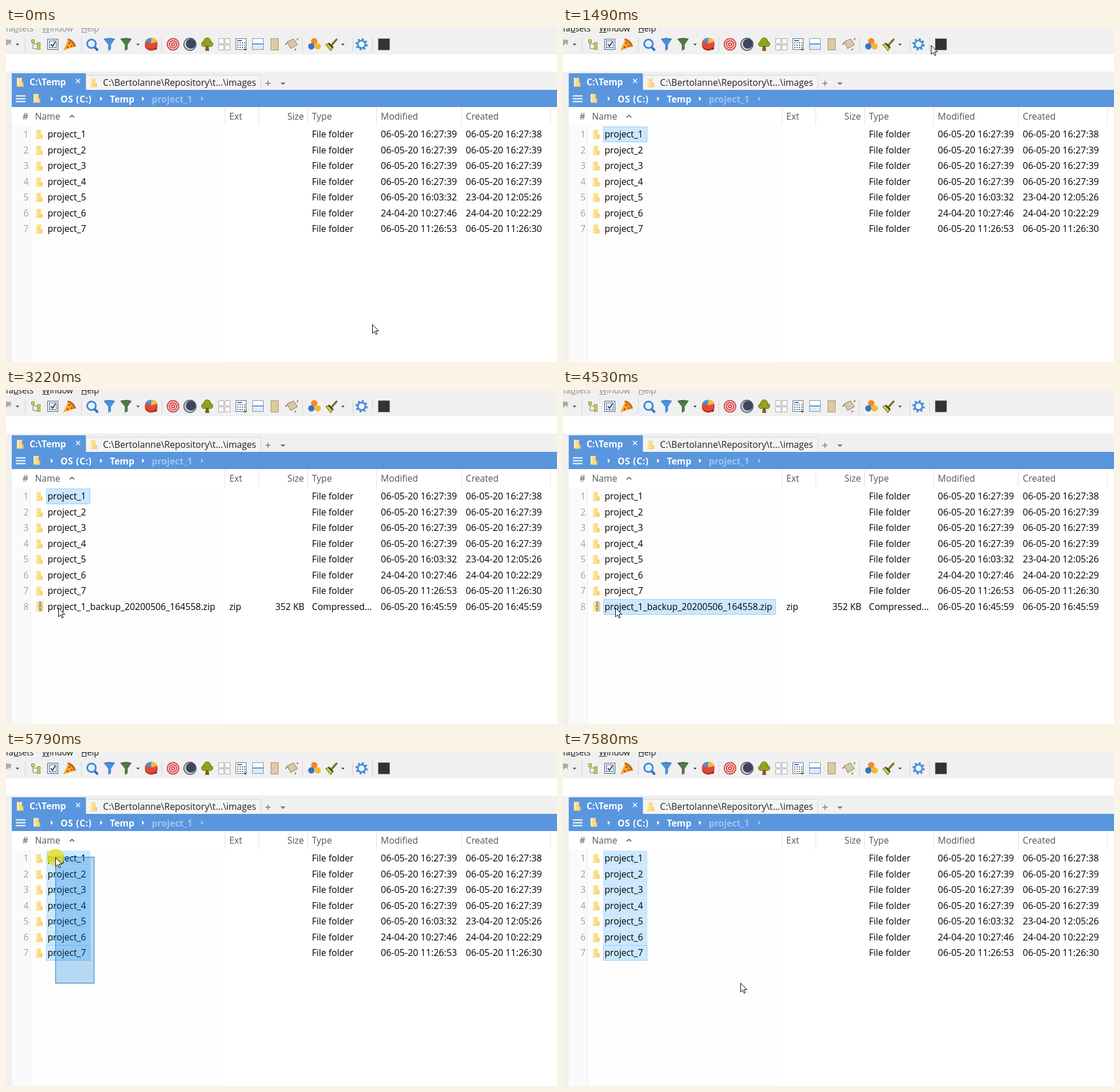
These frames come from a looping animation (960 by 583 pixels, 8000 ms). An HTML page:

```html
<!DOCTYPE html>
<html lang="en">
<head>
<meta charset="utf-8">
<title>File manager</title>
<style>
  html, body { margin: 0; width: 100%; height: 100%; overflow: hidden; background: #fff; }
  svg { display: block; width: 100%; height: 100%; font: 15.7px "Open Sans", "Noto Sans", sans-serif; }
  text { white-space: pre; }
  .menu { font-size: 14.3px; }
  .date { font-size: 16px; }
  .head { fill: #555; }
  .num { fill: #a0a0a0; }
  .end { text-anchor: end; }
  .crumb { font-weight: 700; fill: #fff; }
  .sel { fill: #cce8ff; }
  .focus { fill: none; stroke: #99d1ff; }
</style>
</head>
<body>
<svg viewBox="0 0 960 583">
  <defs>
    <g id="folder">
      <path d="M0 1h9v8h2v7H0z" fill="#fbdc85"/>
      <path d="M0 1h3v15H0z" fill="#ffeab0"/>
      <path d="M9 9h2.500v7H9z" fill="#f3c862"/>
      <path d="M0 15h11.500v1.500H0z" fill="#f6d57c"/>
    </g>
    <g id="zip">
      <path d="M0 0h13v18H0z" fill="#f9d672"/>
      <path d="M0 0h4v18H0z" fill="#ffe9a8"/>
      <path d="M5 0h5v18H5z" fill="#d9d6cc"/>
      <path d="M7.500 0v18" stroke="#666" stroke-width="3" stroke-dasharray="1.500 1.500"/>
      <path d="M6 8h3v5H6z" fill="#eee" stroke="#777"/>
    </g>
    <path id="down" d="M-3-1.500h6L0 1.500z" fill="#333"/>
    <path id="next" d="M-2-4l4 4-4 4z"/>
    <path id="funnel" d="M-10-9Q0-12 10-9L3 1V9l-5 3V1z"/>
  </defs>

  <!-- window surfaces -->
  <path d="M0 0h960v46H0zM0 76h960v32H0zM0 108h10v475H0z" fill="#f0f0f0"/>
  <path d="M43 170h338v413H43z" fill="#fdfdfd"/>
  <path d="M10 170h32v413H10z" fill="#fafafa"/>
  <path d="M42.500 170v413" stroke="#ececec"/>
  <rect id="nameHover" x="43" y="139" width="338" height="31" fill="#d9ebf9"/>

  <!-- menu -->
  <g id="menu" class="menu">
    <text x="-2" y="5.500">Tabsets</text>
    <text x="63" y="5.500">Window</text>
    <text x="131" y="5.500">Help</text>
    <path d="M14 7.500h8M63 7.500h13M131 7.500h10" stroke="currentColor" fill="none"/>
  </g>

  <!-- toolbar -->
  <path d="M33.500 16v26M131.500 16v26M271.500 16v26M516.500 16v26M604.500 16v26M638.500 16v26" stroke="#d2d2d2"/>
  <path d="M0 20l9 1-1 9-3-3-5 4z" fill="#aaa"/>
  <use href="#down" x="20" y="29"/><use href="#down" x="230" y="29"/><use href="#down" x="587" y="29"/>

  <path d="M47 24v12h7M47 28h7" fill="none" stroke="#777"/>
  <path d="M44.500 20.500h5v5h-5zM54.500 25.500h5v5h-5zM54.500 32.500h5v5h-5z" fill="#cbdc52" stroke="#7d8d1c"/>

  <rect x="72.500" y="19.500" width="18" height="18" fill="#fff" stroke="#36587a"/>
  <rect x="75.500" y="22.500" width="12" height="12" fill="#fff" stroke="#36587a"/>
  <path d="M78 28l3 4 5-8" fill="none" stroke="#234567" stroke-width="2"/>

  <path d="M100 39l9-20 12 13z" fill="#f5a623"/>
  <path d="M108 18q11 3 14 14l-3 1q-4-9-12-12z" fill="#c0691d"/>
  <path d="M109 25h3v3h-3zM113 30h3v3h-3zM106 32h3v3h-3z" fill="#d6401f"/>

  <path d="M154 33l5 5" stroke="#2f6fb5" stroke-width="4" stroke-linecap="round"/>
  <circle cx="149" cy="27.500" r="7.500" fill="#e6f2fd" stroke="#3c89d6" stroke-width="3"/>

  <use href="#funnel" x="180" y="28" fill="#4a90da"/>
  <use href="#funnel" x="209" y="28" fill="#4f7a46"/>
  <path d="M171 19.500q9-3 18 0" fill="none" stroke="#2e6db2"/>
  <path d="M200 19.500q9-3 18 0" fill="none" stroke="#33562c"/>

  <ellipse cx="253" cy="30" rx="11" ry="9.500" fill="#b93224"/>
  <ellipse cx="253" cy="27" rx="11" ry="9.500" fill="#e24a37"/>
  <path d="M253 27l-10-4q3-6 10-6z" fill="#4a90da"/>
  <path d="M253 27V17q9 0 11 7z" fill="#f4b93a"/>
  <use href="#down" x="261" y="37"/>

  <g fill="#f7dedc" stroke="#d34a4a" stroke-width="2">
    <circle cx="291" cy="28.500" r="10"/><circle cx="291" cy="28.500" r="6.300"/>
    <circle cx="291" cy="28.500" r="2.600"/>
  </g>

  <circle cx="320.500" cy="28.500" r="10.700" fill="#c9ccd4" stroke="#4a5064" stroke-width="1.400"/>
  <circle cx="322" cy="27.500" r="8.500" fill="#3f465c"/>

  <path d="M348 30h5l1 10h-7z" fill="#8a5a23"/>
  <g fill="#8fa51e" stroke="#66780f">
    <circle cx="345" cy="28" r="4.500"/><circle cx="356" cy="28" r="4.500"/>
    <circle cx="350.500" cy="23" r="6"/>
  </g>
  <path d="M346 22h9v9h-9z" fill="#8fa51e"/>

  <path d="M370.500 18.500h9v9h-9zM381.500 18.500h9v9h-9zM370.500 29.500h9v9h-9zM381.500 29.500h9v9h-9z" fill="#fafafa" stroke="#aaa"/>

  <rect x="400.500" y="18.500" width="18" height="19" fill="#fff" stroke="#5d6f85"/>
  <path d="M403 22h8" stroke="#3c72b0" stroke-width="2"/>
  <path d="M403 26h14M403 30h14M403 34h14" stroke="#60768f" stroke-width="2" stroke-dasharray="2 2"/>
  <use href="#down" x="417" y="38"/>

  <rect x="429.500" y="18.500" width="19" height="19" fill="#fff" stroke="#7b95b0"/>
  <path d="M430 28h18" stroke="#4a90da" stroke-width="2"/>
  <path d="M430 30h18v7h-18z" fill="#dfeaf5"/>

  <rect x="461.500" y="18.500" width="13" height="20" fill="#dccaa4" stroke="#a99568"/>

  <path d="M487 29l3-3M503 39l2-3M507 21l2-3" stroke="#85765c" stroke-width="2"/>
  <path d="M490 24l11-5 7 10-12 7z" fill="#d8c8a8" stroke="#85765c"/>

  <circle cx="537" cy="23" r="5.500" fill="#f08a24"/>
  <circle cx="532" cy="32" r="5.500" fill="#3576bd"/>
  <circle cx="543" cy="32" r="5.500" fill="#f2b92b"/>

  <path d="M567 30l9-10" stroke="#8b6a2c" stroke-width="3.500" stroke-linecap="round"/>
  <path d="M557 29l6-3 7 7-4 7z" fill="#c3cf3a" stroke="#4f5716"/>
  <path d="M562 27l8 8" stroke="#333" stroke-width="2"/>

  <circle cx="619.500" cy="28.500" r="9" fill="none" stroke="#4a90da" stroke-width="3.500" stroke-dasharray="3.600 3.469"/>
  <circle cx="619.500" cy="28.500" r="6.500" fill="#f4f9ff" stroke="#4a90da" stroke-width="3"/>

  <rect id="button" x="644.500" y="14.500" width="28" height="28" stroke="#bcbcbc"/>
  <rect x="648.500" y="18.500" width="20" height="20" fill="#333"/>

  <!-- tabs -->
  <path d="M10 79h129v29H10zM10 108h950v30H10z" fill="#5a96de"/>
  <path d="M139.500 108V82.500h304V108" fill="#f4f4f4" stroke="#d6d6d6"/>
  <use href="#folder" x="19" y="86"/>
  <text class="crumb" x="41" y="100">C:\Temp</text>
  <path d="M122 89l7 7M129 89l-7 7" stroke="#fff" stroke-width="1.500"/>
  <use href="#folder" x="147" y="87"/>
  <text x="169" y="101" fill="#222">C:\Bertolanne\Repository\t...\images</text>
  <path d="M452 96.500h9M456.500 92v9" stroke="#777" stroke-width="1.500"/>
  <path d="M478 95h9l-4.500 4.500z" fill="#777"/>

  <!-- breadcrumbs -->
  <path d="M17 118.500h17M17 123.500h17M17 128.500h17" stroke="#fff" stroke-width="2"/>
  <use href="#folder" x="48" y="114"/>
  <g fill="#fff">
    <use href="#next" x="80" y="123.500"/><use href="#next" x="166" y="123.500"/><use href="#next" x="239" y="123.500"/>
  </g>
  <use href="#next" x="342" y="123.500" fill="#a9c9f0"/>
  <g class="crumb">
    <text x="95" y="129.500" letter-spacing=".6">OS (C:)</text>
    <text x="181" y="129.500">Temp</text>
    <text x="254" y="129.500" fill="#9fc3ef">project_1</text>
  </g>

  <!-- column heads -->
  <path d="M381.500 139v31M440.500 139v31M525.500 139v31M645.500 139v31M793.500 139v31M948.500 139v31" stroke="#e2e2e2"/>
  <g class="head">
    <text class="end" x="39" y="160">#</text>
    <text x="50.500" y="160">Name</text>
    <text x="389" y="160">Ext</text>
    <text class="end" x="519" y="160">Size</text>
    <text x="533" y="160">Type</text>
    <text x="653" y="160">Modified</text>
    <text x="801" y="160">Created</text>
  </g>
  <path d="M111 156l4-3.500 4 3.500" fill="none" stroke="#444" stroke-width="1.500"/>

  <g id="rows"></g>
  <rect id="marquee" fill="#0078d7" fill-opacity=".28" stroke="#1a7fd0"/>
  <circle id="press" r="15" fill="#e6e11e" fill-opacity=".8"/>
  <path id="cursor" d="M.5.5v15.500l3.600-3.400 2.400 5.400 2.300-1-2.400-5.300h5z" fill="#fff" stroke="#000"/>
</svg>

<script>
const LOOP = 8000;
const $ = id => document.getElementById(id);
const show = (el, on) => el.setAttribute("visibility", on ? "visible" : "hidden");
const set = (el, attrs) => Object.entries(attrs).forEach(([k, v]) => el.setAttribute(k, v));
const within = (t, [a, b]) => t >= a && t < b;

// modified, created
const dates = [
  ["06-05-20 16:27:39", "06-05-20 16:27:38"],
  ["06-05-20 16:27:39", "06-05-20 16:27:39"],
  ["06-05-20 16:27:39", "06-05-20 16:27:39"],
  ["06-05-20 16:27:39", "06-05-20 16:27:39"],
  ["06-05-20 16:03:32", "23-04-20 12:05:26"],
  ["24-04-20 10:27:46", "24-04-20 10:22:29"],
  ["06-05-20 11:26:53", "06-05-20 11:26:30"],
  ["06-05-20 16:45:59", "06-05-20 16:45:59"]
];
const ZIP = 7, ROW = 27.5, TOP = 172;

$("rows").innerHTML = dates.map(([modified, created], i) => {
  const zip = i === ZIP, top = Math.round(TOP + i * ROW), y = top + 19;
  const name = zip ? "project_1_backup_20200506_164558.zip" : `project_${i + 1}`;
  const width = zip ? 301 : 77;
  return `<g>
    <rect class="sel" x="70" y="${top}" width="${width}" height="${ROW}"/>
    <rect class="focus" x="70.5" y="${top + .5}" width="${width - 1}" height="26"/>
    <text class="num end" x="39.500" y="${y}">${i + 1}</text>
    <use href="#${zip ? "zip" : "folder"}" x="52" y="${top + (zip ? 4 : 5)}"/>
    <text x="72.500" y="${y}">${name}</text>
    ${zip ? `<text x="389" y="${y}">zip</text><text class="end" x="520" y="${y}">352 KB</text>` : ""}
    <text x="533" y="${y}">${zip ? "Compressed..." : "File folder"}</text>
    <text class="date" x="653" y="${y}">${modified}</text>
    <text class="date" x="801" y="${y}">${created}</text>
  </g>`;
}).join("");
const rows = [...$("rows").children];

// first step, last step, steps, x, y
const moves = [
  [70, 590, 8, 116, 188],
  [1110, 1490, 6, 641, 30],
  [1570, 1660, 2, 665, 24],
  [2590, 2980, 6, 150, 474],
  [3060, 3220, 3, 91, 380],
  [4690, 5020, 5, 153, 405],
  [5310, 5790, 7, 86, 184],
  [6020, 6330, 5, 668, 36],
  [6400, 6480, 2, 656, 35],
  [6630, 6630, 1, 657, 28],
  [7120, 7580, 7, 309, 403]
];
const presses = [[750, 910], [1820, 1920], [3600, 3700], [5240, 5940], [6780, 6870]];
const drag = [5240, 5940], anchor = [153, 404];

function tip(t) {
  let x = 638, y = 517;
  for (const [from, to, n, endX, endY] of moves) {
    if (t < from) break;
    const k = n === 1 ? 1 : Math.min(n, 1 + Math.floor((t - from) / (to - from) * (n - 1) + 1e-6));
    const p = 1 - (1 - k / n) ** 1.5;
    x += (endX - x) * p;
    y += (endY - y) * p;
  }
  return [Math.round(x), Math.round(y)];
}

function drawRows(t) {
  const focus = t < 750 ? -1 : t < 3600 ? 0 : t < 4690 ? ZIP : 6;
  const [left, top] = tip(Math.min(t, drag[1]));
  rows.forEach((row, i) => {
    const caught = left < 147 && top < TOP + (i + 1) * ROW;
    const selected = t < drag[0] ? i === focus && t < 4690 : caught;
    const present = i !== ZIP || within(t, [2590, 4690]);
    row.style.display = present ? "" : "none";
    show(row.children[0], selected);
    show(row.children[1], i === focus);
  });
}

function draw(t) {
  const [x, y] = tip(t);
  const pressed = presses.some(span => within(t, span));
  const overButton = x >= 645 && x <= 673 && y >= 14 && y <= 42;
  const overName = x >= 43 && x < 381 && y >= 139 && y < 170;

  const ink = t < 830 || within(t, [4530, 4690]) ? "#8a8a8a" : "#111";
  set($("menu"), { fill: ink, color: ink });
  show($("nameHover"), overName);
  show($("button"), overButton);
  set($("button"), { fill: pressed ? "#cfcfcf" : "#dedede" });
  drawRows(t);

  show($("marquee"), within(t, drag) && x < anchor[0]);
  set($("marquee"), {
    x: x + .5, y: y - .5,
    width: Math.max(0, anchor[0] - x), height: Math.max(0, anchor[1] - y)
  });
  show($("press"), pressed);
  set($("press"), { cx: x, cy: y });
  set($("cursor"), { transform: `translate(${x} ${y})` });
}

const start = performance.now();
function tick() {
  draw((performance.now() - start) % LOOP);
  requestAnimationFrame(tick);
}
tick();
</script>
</body>
</html>
```
